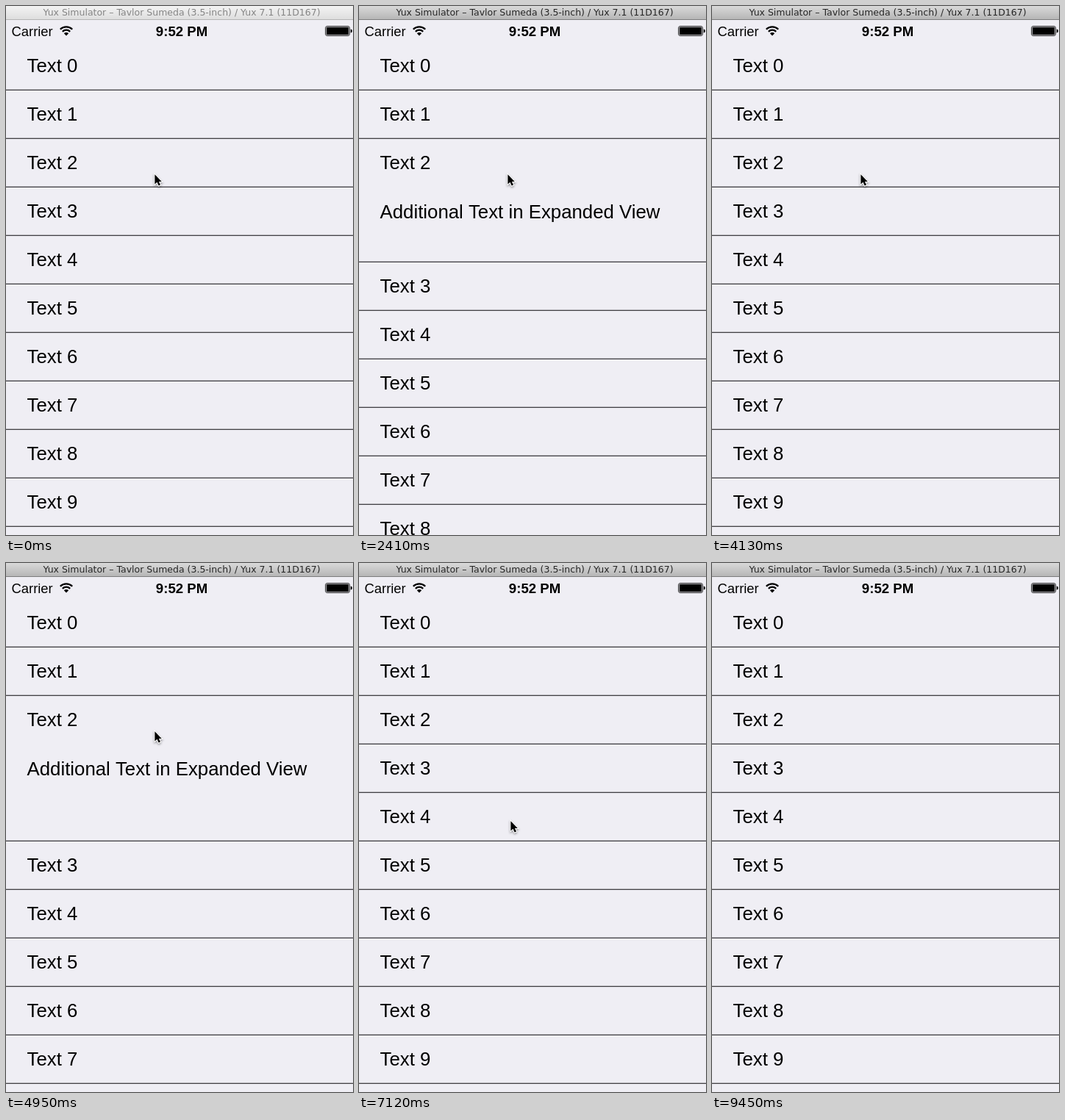
Animation, 472 px wide and 720 px high, one loop 9900 ms. Source, as an HTML page with a canvas:

```html
<!DOCTYPE html>
<html lang="en">
<head>
<meta charset="utf-8">
<title>Expanding table rows</title>
<style>
  html, body { margin: 0; width: 100%; height: 100%; overflow: hidden; background: #efeef4; }
  canvas { display: block; }
</style>
</head>
<body>
<canvas id="stage" width="472" height="720"></canvas>
<script>
const ctx = document.getElementById('stage').getContext('2d');
const LOOP = 9900, WIDTH = 472, HEIGHT = 720;
const TABLE_TOP = 48, ROW = 66, EXTRA = 132;
const BACKGROUND = '#efeef4';
const SANS = '"Liberation Sans", Arial, sans-serif';

// Each toggle moves one row to open (1) or closed (0).
const toggles = [
  { row: 2, start: 2210, end: 2500, open: 1 },
  { row: 2, start: 3810, end: 4130, open: 0 },
  { row: 2, start: 4640, end: 4950, open: 1 },
  { row: 2, start: 5650, end: 5990, open: 0 },
  { row: 4, start: 7140, end: 7450, open: 1 },
  { row: 4, start: 8700, end: 9020, open: 0 }
];

function ease(t, start, end) {
  const p = Math.min(1, Math.max(0, (t - start) / (end - start)));
  return p * p * (3 - 2 * p);
}

function openness(row, t) {
  let value = 0;
  for (const toggle of toggles) {
    if (toggle.row === row && t >= toggle.start) {
      const p = ease(t, toggle.start, toggle.end);
      value = toggle.open ? p : 1 - p;
    }
  }
  return value;
}

function rect(color, x, y, w, h) {
  ctx.fillStyle = color;
  ctx.fillRect(x, y, w, h);
}

function text(string, x, y, font, color = '#000', align = 'left') {
  ctx.font = font;
  ctx.fillStyle = color;
  ctx.textAlign = align;
  ctx.fillText(string, x, y);
}

function drawRows(t) {
  const font = '25.8px ' + SANS;
  let y = TABLE_TOP;
  for (let i = 0; y < HEIGHT; i++) {
    const open = openness(i, t);
    const height = Math.round(ROW + EXTRA * open);
    ctx.save();
    ctx.beginPath();
    ctx.rect(0, y, WIDTH, height);
    ctx.clip();
    text('Text ' + i, 28.5, y + 42, font);
    if (open > 0) text('Additional Text in Expanded View', 28.5, y + 109, font);
    ctx.restore();
    y += height;
    rect('#b5b4b9', 0, y - 1, WIDTH, 1);
    rect('#434246', 0, y, WIDTH, 1);
  }
}

function drawTitleBar(active) {
  const shade = ctx.createLinearGradient(0, 0, 0, 18);
  shade.addColorStop(0, active ? '#d9d9d9' : '#f3f3f3');
  shade.addColorStop(1, active ? '#b6b6b6' : '#dedede');
  rect(shade, 0, 0, WIDTH, 18);
  rect(active ? '#7d7d7d' : '#b4b4b4', 0, 18, WIDTH, 1);
  text('Yux Simulator – Tavlor Sumeda (3.5-inch) / Yux 7.1 (11D167)', 239, 12.5,
    '12.5px "DejaVu Sans", sans-serif', active ? '#262626' : '#858585', 'center');
}

function drawStatusBar() {
  text('Carrier', 7.5, 41, '18.4px ' + SANS);
  text('9:52 PM', 239, 41, 'bold 18.6px ' + SANS, '#000', 'center');

  // Signal arcs
  ctx.strokeStyle = '#000';
  ctx.lineWidth = 2.3;
  for (const radius of [7.3, 11.6]) {
    ctx.beginPath();
    ctx.arc(82, 40, radius, -Math.PI * 0.75, -Math.PI * 0.25);
    ctx.stroke();
  }
  ctx.fillStyle = '#000';
  ctx.beginPath();
  ctx.moveTo(82, 40.5);
  ctx.arc(82, 40.5, 4.5, -Math.PI * 0.75, -Math.PI * 0.25);
  ctx.fill();

  // Battery
  ctx.lineWidth = 0.8;
  ctx.beginPath();
  ctx.roundRect(434.5, 27.5, 33, 13, 2.5);
  ctx.stroke();
  ctx.beginPath();
  ctx.roundRect(435.8, 28.8, 30.4, 10.4, 1);
  ctx.roundRect(468.8, 31.5, 2, 5, [0, 2, 2, 0]);
  ctx.fill();
}

const arrow = new Path2D('M0 0V13.2L3.1 10.5 5.2 15.3 7.6 14.3 5.5 9.6H9.4Z');

function drawCursor(t) {
  if (t >= 9450) return;
  const move = ease(t, 6130, 6610);
  const leave = Math.max(0, (t - 9060) / 390) ** 2;
  ctx.save();
  ctx.translate(202.4 + 4 * move + 18 * leave, 229.3 + 122 * move + 372 * leave);
  ctx.shadowColor = 'rgba(0, 0, 0, 0.4)';
  ctx.shadowBlur = 3;
  ctx.shadowOffsetY = 1.5;
  ctx.lineWidth = 2;
  ctx.strokeStyle = '#fff';
  ctx.stroke(arrow);
  ctx.shadowColor = 'transparent';
  ctx.fillStyle = '#000';
  ctx.fill(arrow);
  ctx.restore();
}

function draw() {
  const t = performance.now() % LOOP;
  rect(BACKGROUND, 0, 0, WIDTH, HEIGHT);
  drawRows(t);
  drawTitleBar(t >= 2150);
  drawStatusBar();
  drawCursor(t);
  requestAnimationFrame(draw);
}
draw();
</script>
</body>
</html>
```
